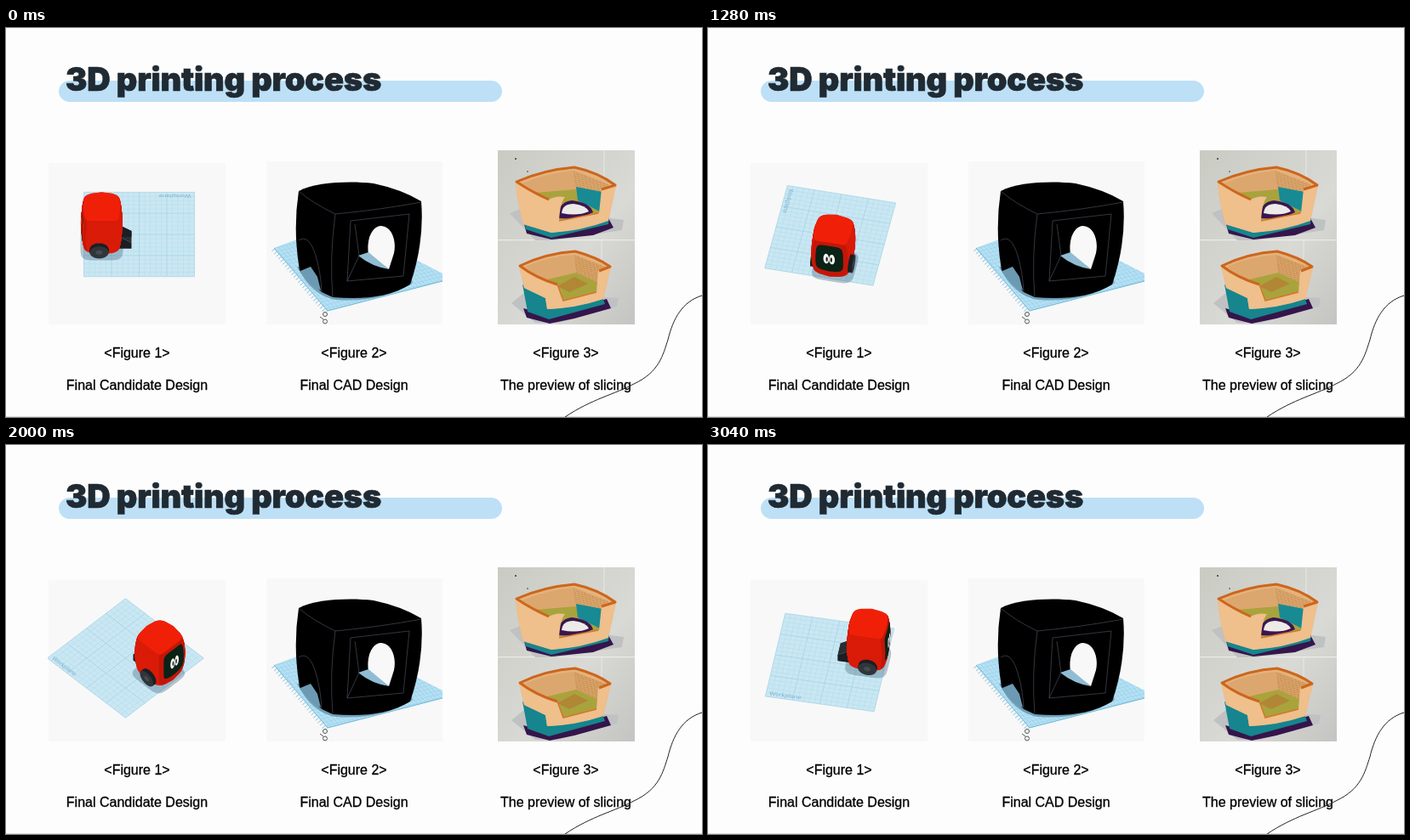
These frames come from a looping animation (818x458 px, 3120 ms). An HTML page with a canvas:

```html
<!DOCTYPE html>
<html lang="en">
<head>
<meta charset="utf-8">
<title>3D printing process</title>
<style>
  html, body { margin: 0; width: 100%; height: 100%; overflow: hidden; background: #fdfdfd; }
  svg, canvas { position: absolute; left: 0; top: 0; }
  .title { font: 900 38px Inter, sans-serif; letter-spacing: -.2px; fill: #1f2a33; stroke: #1f2a33; stroke-width: .7; }
  .label { font: 16px "Liberation Sans", Arial, sans-serif; text-anchor: middle; stroke: #000; stroke-width: .3; }
</style>
</head>
<body>
<svg width="818" height="458" viewBox="0 0 818 458">
  <defs>
    <pattern id="grid" width="5" height="5" patternUnits="userSpaceOnUse" patternTransform="matrix(.9 -.22 .68 .74 315 259)">
      <path d="M0 0H5M0 0V5" stroke="#7fc3e2" stroke-width=".7"/>
    </pattern>
    <pattern id="layers" width="4" height="2.4" patternUnits="userSpaceOnUse" patternTransform="rotate(-12)">
      <path d="M0 1H3" stroke="#b07a3c" stroke-width=".6"/>
    </pattern>
    <linearGradient id="wall" x2="1" y2="1">
      <stop stop-color="#c9cbc3"/><stop offset=".6" stop-color="#d9d9d5"/><stop offset="1" stop-color="#c4c5c2"/>
    </linearGradient>
  </defs>

  <path d="M0 457.5H818" stroke="#dedede"/>
  <rect x="62" y="62" width="521" height="25" rx="12.5" fill="#bde0f7"/>
  <text class="title" x="70" y="74">3D printing process</text>

  <rect x="50" y="159" width="208" height="190" fill="#f8f8f8"/>

  <!-- CAD model -->
  <rect x="306" y="157" width="207" height="192" fill="#f8f8f8"/>
  <g>
    <path d="M315 259L350 246L480 272L513 289V298L378 333Z" fill="#b5e0f3"/>
    <path d="M315 259L350 246L480 272L513 289V298L378 333Z" fill="url(#grid)"/>
    <path d="M315 259L378 333L513 298" fill="none" stroke="#6db6d8"/>
    <path d="M314 261L376 335" stroke="#9ccbe0" stroke-width="5" stroke-dasharray="1 3"/>
    <path d="M342 281Q360 316 388 320Q440 324 478 300L470 280Z" fill="#5d8ba5" opacity=".75"/>
    <path d="M344 192C365 181 405 180 432 183Q465 190 488 204Q492 252 475 302C450 317 420 320 384 317L371 311L345 285Q337 238 344 192Z"/>
    <path d="M346 286L358 281L366 293L370 309Q354 302 346 286Z" fill="#6d9ab3"/>
    <path d="M426 267C423 245 432 233 441 233C454 234 459 251 456 265L450 284Z" fill="#f8f8f8"/>
    <path d="M414 268L426 264L450 284Q430 281 414 268Z" fill="#8fbdd3"/>
    <path d="M344 192Q360 206 387 219Q440 214 488 205M387 219Q380 270 384 317M405 227L474 219L467 292L401 298Z
      M410 231L415 268L401 298M344 250Q356 242 364 268Q370 288 371 311" fill="none" stroke="#555c6c" stroke-width=".6"/>
    <g fill="none" stroke="#555"><circle cx="375" cy="337" r="2.5"/><circle cx="375" cy="345.5" r="2.5"/><path d="M369 340L373 343"/></g>
  </g>

  <!-- slicing previews -->
  <rect x="578" y="144" width="161" height="205" fill="url(#wall)"/>
  <path d="M578 249.7H739" stroke="#f0f0ee"/>
  <path d="M703 144V200M700 250V292" stroke="#e8e8e4"/>
  <circle cx="599" cy="154" r="1" fill="#333"/><circle cx="613" cy="169" r=".9" fill="#666"/>
  <g>
    <path d="M592 218L610 211L726 226L724 238L645 250H622Z" fill="#bfc1c3"/>
    <path d="M609 231L640 242L708 224L714 235L690 244L641 249L612 242Z" fill="#35154b"/>
    <path d="M608 225L641 239L709 221L708 231L641 247L611 237Z" fill="#16858d"/>
    <path d="M599 181Q632 166 668 163Q696 169 717 185L708 226Q675 237 641 241L608 231Q601 207 599 181Z" fill="#e5b27c"/>
    <path id="back" d="M607 183Q635 171 667 168L708 184L700 205L669 192L637 201Z" fill="#dca76f"/>
    <use href="#back" style="fill:url(#layers)"/>
    <path d="M667 168L708 184L700 205L669 192Z" fill="url(#layers)"/>
    <path d="M622 194L669 190L700 208L697 222L640 227Z" fill="#a9a33d"/>
    <path d="M670 187L701 193L698 216L672 203Z" fill="#188a94"/>
    <path d="M649 224Q648 205 665 203Q686 205 690 217L672 225Z" fill="#3b1650"/>
    <path d="M653 218Q654 207 667 207Q682 209 685 216Q672 222 653 218Z" fill="#ecebe8"/>
    <path d="M599 181Q620 193 638 202Q646 197 657 199Q651 206 650 227L697 218L700 189L717 185L708 227Q676 239 641 241L608 231Q601 207 599 181Z" fill="#efbf8c"/>
    <path d="M650 227L696 218" stroke="#d5762a" stroke-width="1.5"/>
    <path d="M638 202Q618 193 600 181Q632 167 668 164Q696 170 716 185L700 190" fill="none" stroke="#cc661d" stroke-width="3" stroke-linejoin="round"/>
  </g>
  <g>
    <path d="M594 324L610 311L720 318L718 328L650 347H622Z" fill="#bfc1c3"/>
    <path d="M608 330L638 338L706 319L711 330L668 342L639 348L612 341Z" fill="#35154b"/>
    <path d="M607 302L634 317L700 314L704 325L638 343L613 334Z" fill="#16858d"/>
    <path d="M603 280Q635 264 669 262Q695 269 711 281L702 319Q670 329 636 331L634 318L609 306Z" fill="#e5b27c"/>
    <path d="M610 281Q637 269 668 267L670 291L639 302Z" fill="#dca76f"/>
    <path d="M668 267L704 281L699 304L670 291Z" fill="#d9a369"/>
    <path d="M668 267L704 281L699 304L670 291Z" fill="url(#layers)"/>
    <path d="M628 298L670 288L701 302L695 312L652 321Z" fill="#a9a33d"/>
    <path d="M648 304L668 293L684 301L662 311Z" fill="#b8792f" opacity=".6"/>
    <path d="M648 304L668 293L684 301L662 311Z" fill="url(#layers)"/>
    <path d="M603 280Q622 294 648 302L655 321L694 311L696 285L711 281L702 319Q670 330 636 331L634 318L609 306Z" fill="#efbf8c"/>
    <path d="M648 302L655 321L694 311" fill="none" stroke="#d5762a" stroke-width="1.5"/>
    <path d="M648 302Q622 294 604 280Q635 265 669 263Q695 270 710 281L697 286" fill="none" stroke="#cc661d" stroke-width="3" stroke-linejoin="round"/>
  </g>

  <g class="label">
    <text x="154" y="388">&lt;Figure 1&gt;</text><text x="154" y="426">Final Candidate Design</text>
    <text x="409" y="388">&lt;Figure 2&gt;</text><text x="409" y="426">Final CAD Design</text>
    <text x="658" y="388">&lt;Figure 3&gt;</text><text x="658" y="426">The preview of slicing</text>
  </g>
  <path d="M657 458C688 437 716 431 738 419C768 405 772 385 778 367C784 342 795 322 818 315" fill="none" stroke="#222"/>
</svg>
<canvas id="view" width="818" height="458"></canvas>
<script>
const ctx = document.getElementById('view').getContext('2d');
const LOOP = 3120, STEP = 80;
const FLAT = .764, RISE = .645;   // camera tilt: ground squash and height scale
const HALF = 65;                  // half the work plane
// time, heading in degrees, plane centre x, y
const KEYS = [
  [0, 180, 156.5, 243], [400, 136, 149, 242], [960, 135, 148.5, 241.5],
  [1520, 77, 140, 246.5], [1920, 45, 140.5, 251], [2640, 45, 140.5, 251],
  [2800, 35, 140, 252], [3040, 10.4, 143, 256]
];
let cos, sin, cx, cy;

function pose(t) {
  let i = 1;
  while (i < KEYS.length - 1 && KEYS[i][0] < t) i++;
  const a = KEYS[i - 1], b = KEYS[i], f = (t - a[0]) / (b[0] - a[0]);
  return a.map((v, j) => v + (b[j] - v) * f);
}

// robot space to screen: x forward, y to its right, z up
function project([x, y, z]) {
  x += 44; y -= 13;
  return [cx + x * cos - y * sin, cy + FLAT * (x * sin + y * cos) - RISE * z];
}

function poly(points, fill, edge = 0) {
  ctx.beginPath();
  points.forEach(p => ctx.lineTo(...project(p)));
  ctx.closePath();
  ctx.fillStyle = ctx.strokeStyle = fill;
  ctx.fill();
  if (edge) { ctx.lineWidth = edge; ctx.stroke(); }
}

// unit cube to bulging body
const bulge = (a, b, c) => [
  23 * a * (1 - .1 * (b * b + c * c)),
  23 * b * (1 - .1 * (a * a + c * c)),
  36 + 34 * c * (1 - .1 * (a * a + b * b))
];

// rounded patch in two face coordinates
function patch(face, u, v, ru, rv, power, fill, edge) {
  const bend = n => Math.sign(n) * Math.abs(n) ** power, pts = [];
  for (let i = 0; i < 120; i++) {
    const a = i * Math.PI / 60;
    pts.push(face(u + ru * bend(Math.cos(a)), v + rv * bend(Math.sin(a))));
  }
  poly(pts, fill, edge);
}

function wheel(side) {
  const out = cos * side > 0 ? 1 : -1;
  for (let i = 0; i < 6; i++) {
    const y = side * (out > 0 ? 20 + i : 25 - i);
    patch((u, v) => [3 + u, y, 12 + v], 0, 0, 11, 11, 1, i < 5 ? '#1c2024' : '#30353a');
  }
  if (out > 0) patch((u, v) => [3 + u, side * 25, 12 + v], 0, 0, 4, 4, 1, '#454b50');
}

function plane(angle) {
  ctx.save();
  ctx.translate(cx, cy);
  ctx.scale(1, FLAT);
  ctx.rotate(angle);
  ctx.fillStyle = '#c9e7f3';
  ctx.fillRect(-HALF, -HALF, 2 * HALF, 2 * HALF);
  for (let i = 0; i <= 20; i++) {
    const p = -HALF + i * 6.5;
    ctx.strokeStyle = i % 5 ? '#b9deec' : '#a2d1e5';
    ctx.lineWidth = .8;
    ctx.beginPath();
    ctx.moveTo(p, -HALF); ctx.lineTo(p, HALF);
    ctx.moveTo(-HALF, p); ctx.lineTo(HALF, p);
    ctx.stroke();
  }
  ctx.fillStyle = '#7db5d0';
  ctx.font = '8px "Liberation Sans", Arial, sans-serif';
  ctx.fillText('Workplane', -HALF + 4, HALF - 3);
  ctx.restore();
}

function robot() {
  const near = cos > 0 ? 1 : -1;
  const front = (b, c) => bulge(1, b, c);
  const glass = (b, c) => bulge(1.08, b, c);
  patch((u, v) => [u, v, 0], 0, near * 2, 25, 25, .4, 'rgba(62,98,125,.35)');

  // tail block
  const y = 9;
  poly([[-20, -y, 0], [-35, -y, 0], [-35, -y, 11], [-20, -y, 22]], '#1b1e22');
  poly([[-35, -y, 0], [-35, y, 0], [-35, y, 11], [-35, -y, 11]], '#1b1e22');
  poly([[-20, -y, 22], [-35, -y, 11], [-35, y, 11], [-20, y, 22]], '#2a2e33');
  poly([[-20, y, 0], [-35, y, 0], [-35, y, 11], [-20, y, 22]], '#1b1e22');

  wheel(-near);
  // stacked slices give the full silhouette
  for (let c = -1; c <= 1; c += .05) patch((a, b) => bulge(a, b, c), 0, 0, 1, 1, .15, '#d91b08', 3);
  if (sin > -.1) patch(front, 0, 0, 1, 1, .15, '#c41608', 2);
  patch((a, b) => bulge(a, b, 1), 0, 0, 1, 1, .15, '#f02008', 2);
  if (sin > -.1) {
    patch(glass, 0, .1, .82, .75, .3, '#0b2216');
    for (const s of [-1, 1]) {
      patch(glass, s * .17, .12, .17, .29, 1, '#f4f4f2');
      patch(glass, s * .13, .1, .055, .14, 1, '#1a1d1c');
    }
  }
  wheel(near);
}

function frame(now) {
  const t = Math.floor(now % LOOP / STEP) * STEP;
  const [, heading, x, y] = pose(t), angle = heading * Math.PI / 180;
  cos = Math.cos(angle); sin = Math.sin(angle); cx = x; cy = y;
  ctx.clearRect(0, 0, 818, 458);
  ctx.save();
  ctx.beginPath();
  ctx.rect(49, 159, 209, 190);
  ctx.clip();
  ctx.lineJoin = 'round';
  plane(angle);
  robot();
  ctx.restore();
  requestAnimationFrame(frame);
}
requestAnimationFrame(frame);
</script>
</body>
</html>
```
